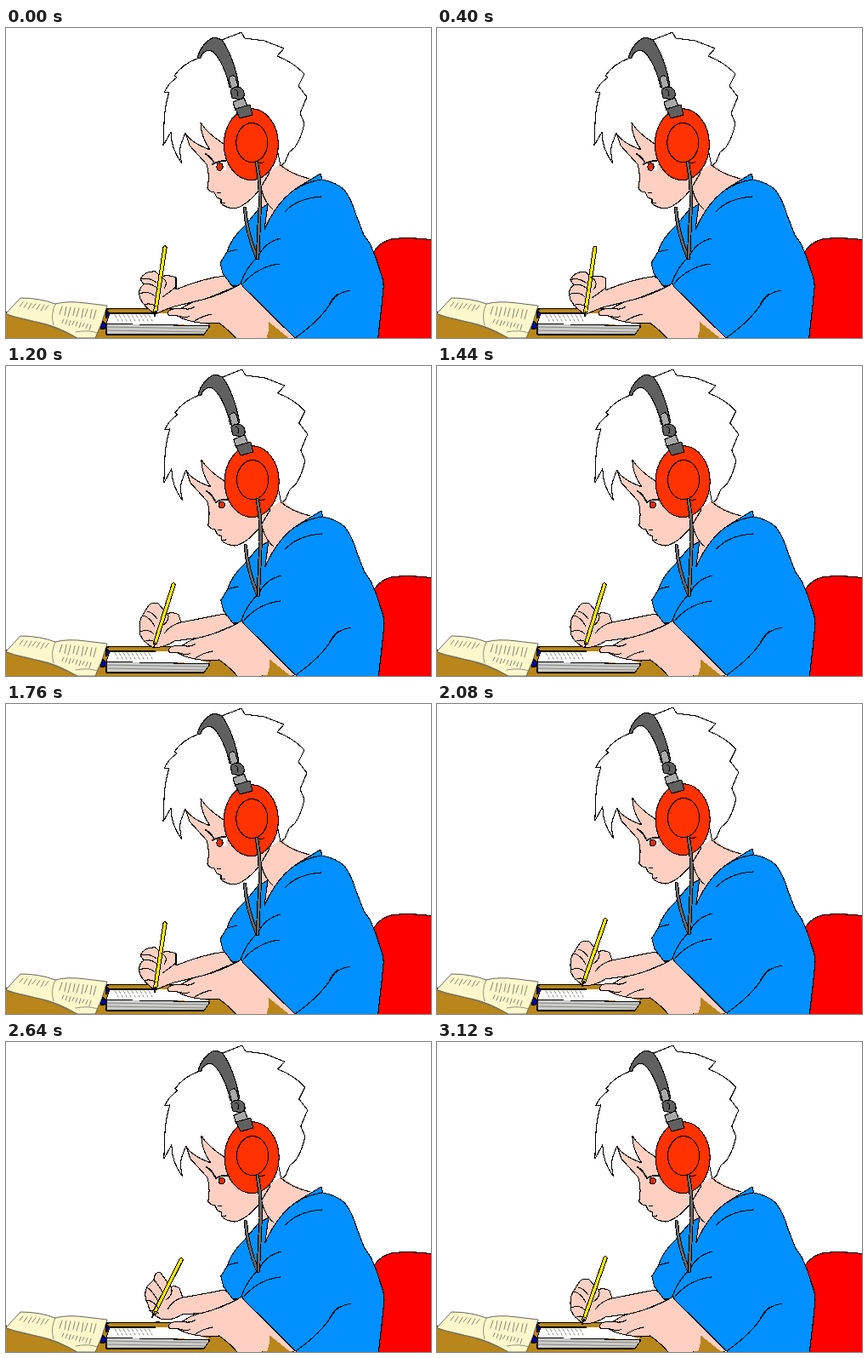
Write an HTML page that moves like this. It is 500 px wide and 364 px high and loops after 3.2 s.

```html
<!DOCTYPE html>
<html lang="en">
<head>
<meta charset="utf-8">
<title>Writing with headphones</title>
<style>
html, body { margin: 0; width: 100%; height: 100%; overflow: hidden; background: #fff; }
svg { display: block; width: 100vw; height: 100vh; shape-rendering: crispEdges; }
path, ellipse { stroke: #000; stroke-width: 1.1; stroke-linejoin: round; stroke-linecap: round; }
.line { fill: none; }
.bare { stroke: none; }
.skin { fill: #ffcfc2; }
.shirt { fill: #0090ff; }
.hair { fill: #fff; }
.dark { fill: #606060; }
.light { fill: #a9a9a9; }
.red { fill: #ff3200; }
.wood { fill: #b8861b; }
.page { fill: #fdf8cc; stroke: #555; stroke-width: .9; }
.edge { fill: none; stroke: #77776a; stroke-width: .8; }
.ink { fill: none; stroke: #66665a; stroke-width: .8; }
.cord { fill: none; stroke-width: 4.4; }
.core { fill: none; stroke: #666; stroke-width: 2.6; }
</style>
</head>
<body>
<svg viewBox="0 0 500 364" preserveAspectRatio="none">
  <path fill="#f00" d="M430 268C436 255 446 247 463 247Q485 246 502 249V368H436Z"/>

  <!-- desk and books -->
  <path class="wood" d="M-2 334L118 330L180 329L290 336L342 366H-2Z"/>
  <path class="page" d="M1 334L17 317Q40 317 58 324Q72 320 94 323L119 326L113 345L105 364H84Q60 350 40 346Q18 342 1 336Z"/>
  <path class="edge" d="M58 324Q52 336 56 349M4 338Q42 344 78 361M82 357Q96 354 108 358"/>
  <g id="text"></g>
  <path fill="#0000c8" stroke-width=".6" d="M118 331L123 337L118 341ZM114 344L118 349L116 353L111 353Z"/>
  <path fill="#ccc" stroke="#555" d="M118 347L240 350L233 360H118Z"/>
  <path class="edge" d="M118 351L238 353M118 355L236 357"/>
  <path class="bare" fill="#fff" d="M122 335L196 335L240 349L118 347Z"/>
  <path class="line" stroke-width=".8" d="M118 347L122 335L176 335"/>
  <g id="notes"></g>

  <!-- writing arm -->
  <g id="hand">
    <path class="skin" id="palm"/>
    <path id="edge" style="stroke-width:5.2"/>
    <path id="wood" style="stroke:#ffec00;stroke-width:3.2"/>
    <path id="lead" style="stroke-width:1.8"/>
    <path class="line" id="fingers"/>
  </g>

  <g id="boy">
    <!-- body -->
    <path class="skin bare" d="M299 176L324 158Q335 170 357 177L345 190L304 238L301 205Z"/>
    <path class="line" d="M322 160Q333 171 357 177M300 188Q304 205 314 213"/>
    <path class="shirt" d="M370 171L372 178Q388 181 398 190Q407 202 412 220L421 243L428 253Q436 270 440 285Q445 298 444 306L441 335L437 370H346L340 364L278 303L266 303L255 288L252 276L260 263Q264 248 281 232L296 214L308 207L304 237Q319 202 345 186Z"/>
    <path class="line" d="M371 178Q352 181 340 190M371 198Q342 200 328 216M323 247Q304 252 297 268Q283 280 276 300M322 277Q296 280 279 300M260 263L272 260M405 308Q389 311 384 320Q370 343 340 364M391 312Q384 317 380 325"/>
    <path class="skin" d="M277 300L279 304L314 338L306 347L300 366H272Q264 356 250 346Q240 348 228 346Q211 344 202 338L191 337Q189 332 196 330L207 329Q218 321 231 319Q255 313 277 300Z"/>
    <path class="skin bare" d="M279 304L340 364H296L305 347Z"/>
    <path class="line" d="M278 303L340 364M207 329Q216 332 222 327M222 344Q231 338 242 336M203 338Q213 341 216 338"/>
    <path class="wood bare" d="M309 345L334 365H306Q310 356 309 345Z"/>

    <!-- head -->
    <path class="skin" d="M211 123L216 138L236 160Q240 172 237 188Q240 193 245 193L248 199L253 201L253 206Q258 211 268 212Q282 210 298 190L310 170L275 110L229 110Z"/>
    <path class="hair bare" id="hairFill"/>
    <path class="line" id="hairLine"/>
    <path class="line" d="M235 148Q241 151 245 159" style="stroke-width:1.8"/>
    <path class="bare" fill="#fff" d="M245 160L260 156L259 167L250 167Z"/>
    <ellipse id="iris" fill="#e32c00" stroke-width=".8" rx="3.6"/>
    <path id="lash" class="line" style="stroke-width:1.8"/>
    <path class="line" d="M248 193L253 194M253 206L258 205"/>

    <!-- headphones -->
    <path class="dark" d="M225 36C227 24 238 12 246 11L254 14C264 28 270 46 274 67L263 70C260 53 250 30 240 26Q231 27 229 35Z"/>
    <path class="light" d="M262 59Q267 53 270 58L274 72L266 75Z"/>
    <path class="dark" d="M264 73Q272 65 279 73Q283 82 275 84L266 82Z"/>
    <path class="line" d="M269 72Q275 74 272 80"/>
    <path class="light" d="M267 87L280 82L284 92L270 97Z"/>
    <ellipse class="red" cx="288.4" cy="136.6" rx="32" ry="42"/>
    <ellipse class="red" cx="289.3" cy="134.6" rx="18.5" ry="23"/>
    <path class="dark" d="M270 95L287 90L290 102L275 106Z"/>
    <path class="line" d="M294 158Q299 160 304 157"/>
    <g id="cords"></g>
  </g>
</svg>
<script>
const $ = id => document.getElementById(id);
const set = (id, attrs) => {
  for (const k in attrs) $(id).setAttribute(k, attrs[k]);
};
function add(parent, d, cls) {
  const p = document.createElementNS("http://www.w3.org/2000/svg", "path");
  p.setAttribute("d", d);
  p.setAttribute("class", cls);
  $(parent).append(p);
}

// short strokes of handwriting and print
for (let i = 0; i < 9; i++) {
  add("text", `M${66 + i * 5} ${327 + i * .5}l${-3 + i % 2} ${9 + i % 3}`, "ink");
  add("text", `M${68 + i * 4} ${342 + i * .8}l-2 ${4 + i % 3}`, "ink");
  if (i < 7) add("text", `M${20 + i * 5} ${322 + i * .6}l-4 ${5 + i % 3}`, "ink");
  add("notes", `M${128 + i * 5} 337l2 3m1 2l1 2`, "ink");
}
for (const d of ["M281 212Q283 240 295 269", "M295 158Q301 190 298 225L296 270"]) {
  add("cords", d, "cord");
  add("cords", d, "core");
}

const fringe = "M225 36Q208 42 198 56L201 58Q190 66 186 76L192 75Q186 95 186 112L185 138L194 122Q194 142 207 159Q203 145 206 136L211 123Q216 134 240 143Q229 127 229 111Q236 123 256 136L262 155";
const crown = "L277 5L281 12L304 15L327 24L319 33Q338 40 351 54L344 68L354 81L346 100L351 112Q348 128 340 140L333 146L328 158L323 162L320 147";
set("hairFill", { d: fringe + "L290 170" + crown.split("").reverse().length && fringe + "L300 160L320 147L323 162L328 158L333 146L340 140Q348 128 351 112L346 100L354 81L344 68L351 54Q338 40 319 33L327 24L304 15L281 12L277 5L254 14Z" });
set("hairLine", { d: fringe + "M254 14" + crown });

const closed = {
  palm: "M257 291Q232 294 200 307L200 293Q192 289 182 292L176 286Q163 285 158 295L162 301Q154 307 158 318Q163 328 176 336Q188 330 198 327L235 318L272 303Z",
  fingers: "M158 295Q168 292 177 299M162 301Q172 299 179 307M157 312Q168 308 175 315M182 292Q192 297 186 306M200 304Q193 310 184 316M162 325Q170 322 177 327"
};
const open = {
  palm: "M257 291Q232 296 206 301L203 292Q196 288 190 291L179 279Q170 276 166 284L161 292Q155 300 158 316Q163 326 174 331Q188 330 198 323L235 318L272 303Z",
  fingers: "M166 288Q172 289 178 297M161 293Q170 295 175 306M158 312Q168 308 174 315M190 291Q194 298 184 305M206 301Q195 303 186 314M162 324Q168 320 175 324"
};
const raised = {
  palm: "M257 291Q232 296 208 300L204 289Q198 285 194 288L182 271Q175 269 174 279L166 287Q161 297 167 308Q168 318 182 325Q195 328 207 320L235 318L272 303Z",
  fingers: "M174 279Q180 286 185 295M166 288Q174 294 179 305M166 303Q174 304 180 314M194 288Q198 296 188 303M208 300Q196 303 190 314M168 316Q174 314 180 319"
};

// pencil: top x, y, tip x, y
const poses = {
  low: { ...closed, pencil: "187 258 175 338" },
  mid: { ...open, pencil: "198 254 171 331" },
  press: { ...open, pencil: "197 257 174 330" },
  high: { ...raised, pencil: "206 256 172 323" }
};
const keys = [
  [0, "low"], [7, "low"], [9, "mid"], [15, "press"], [18, "press"],
  [20, "low"], [22, "low"], [26, "mid"], [33, "high"], [35, "high"],
  [36, "press"], [37, "press"], [38, "low"], [39, "mid"], [40, "low"]
];
const STEP = 80, STEPS = 40;

// blend the numbers of two strings of the same form
function blend(a, b, t) {
  const to = b.match(/[\d.]+/g);
  let i = 0;
  return a.replace(/[\d.]+/g, n => +n + (to[i++] - n) * t);
}

function draw(step) {
  const k = keys.findIndex(key => key[0] > step);
  const [from, a] = keys[k - 1], [to, b] = keys[k];
  const t = (step - from) / (to - from);
  const mix = part => blend(poses[a][part], poses[b][part], t);
  const [x, y, tx, ty] = mix("pencil").split(" ").map(Number);
  const nx = tx + (x - tx) * .07, ny = ty + (y - ty) * .07;
  const shaft = `M${x} ${y}L${nx} ${ny}`;
  set("palm", { d: mix("palm") });
  set("fingers", { d: mix("fingers") });
  set("edge", { d: shaft });
  set("wood", { d: shaft });
  set("lead", { d: `M${nx} ${ny}L${tx} ${ty}` });
  const stroke = Math.sin(t * Math.PI * 2);
  set("hand", { transform: `translate(${stroke * 1.2} ${stroke * -.6})` });

  const bent = (t < .5 ? a : b) === "low";
  set("boy", { transform: bent ? "" : "translate(.8 -1)" });
  set("iris", { cx: bent ? 251.5 : 253, cy: bent ? 163 : 164, ry: bent ? 4.6 : 3.8 });
  set("lash", { d: bent ? "M243 160Q250 156 258 156" : "M246 161Q252 157 260 158" });
}

const start = performance.now();
let shown = -1;
function tick() {
  const step = Math.floor((performance.now() - start) / STEP) % STEPS;
  if (step !== shown) draw(shown = step);
  requestAnimationFrame(tick);
}
tick();
</script>
</body>
</html>
```
